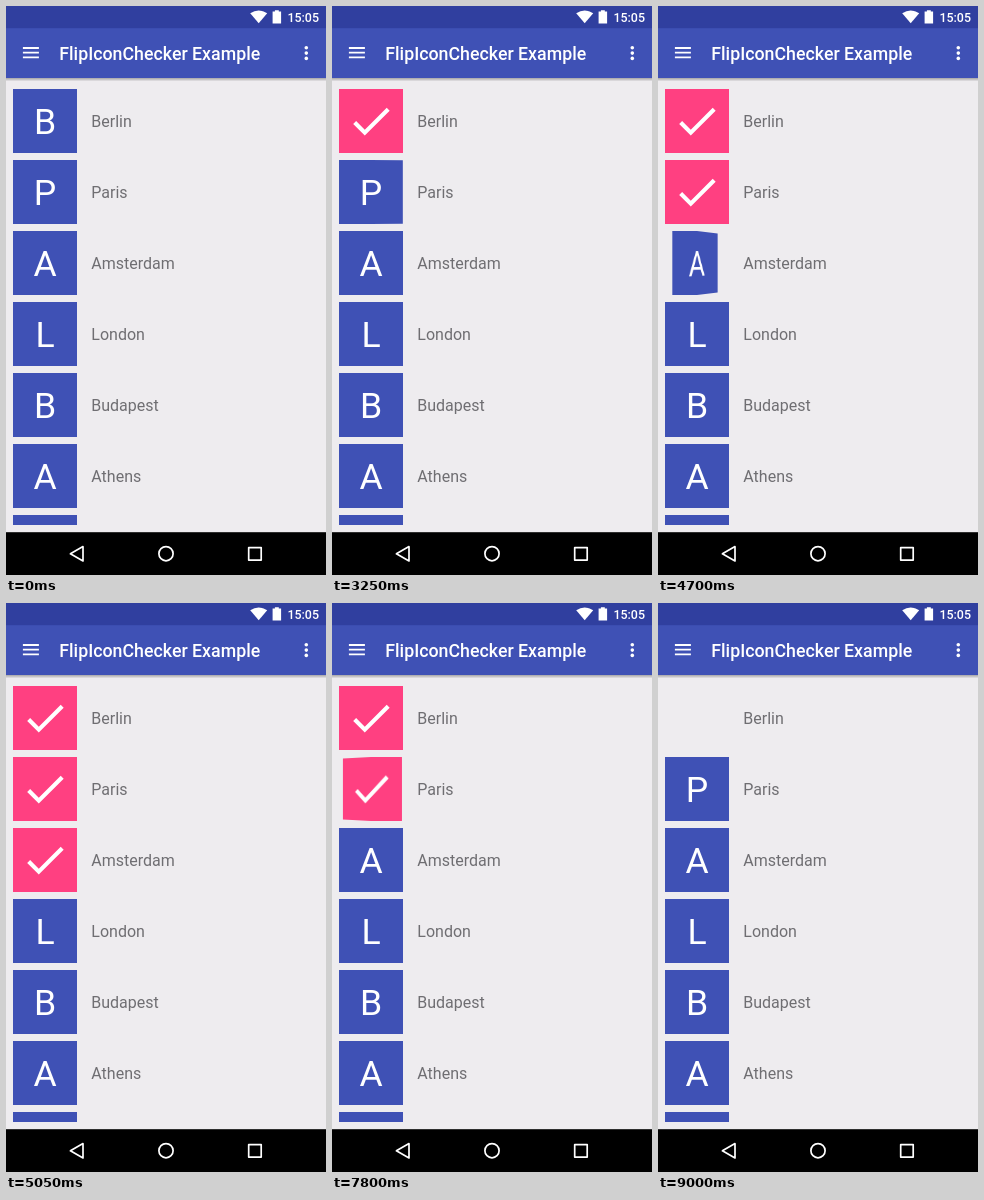
Write an HTML page that moves like this. It is 320x569 px and loops after 9050 ms.

```html
<!DOCTYPE html>
<html lang="en">
<head>
<meta charset="utf-8">
<title>FlipIconChecker Example</title>
<style>
  html, body { margin: 0; width: 100%; height: 100%; overflow: hidden; background: #eeecef; }
  #stage { position: relative; width: 320px; height: 569px; overflow: hidden; font-family: Roboto, sans-serif; }
  #stage > svg { position: absolute; left: 0; top: 0; }
  #list { position: absolute; left: 0; top: 72px; width: 320px; height: 447.1px; overflow: hidden; }
  .tile { position: absolute; left: 7.11px; width: 64px; height: 64px; overflow: hidden; }
  .tile svg { position: absolute; left: 0; top: 0; }
  .city { position: absolute; left: 85.3px; height: 64px; line-height: 65px; font-size: 16px; color: #6f6e72; white-space: nowrap; }
</style>
</head>
<body>
<div id="stage">
  <div id="list"></div>
  <svg width="320" height="569" viewBox="0 0 320 569">
    <defs>
      <linearGradient id="shade" x2="0" y2="1">
        <stop stop-color="#000" stop-opacity=".3"/>
        <stop offset="1" stop-color="#000" stop-opacity="0"/>
      </linearGradient>
    </defs>
    <rect y="72" width="320" height="3.5" fill="url(#shade)"/>
    <rect width="320" height="72" fill="#3f51b5"/>
    <rect width="320" height="22.2" fill="#303f9f"/>
    <g fill="#fff">
      <path d="M252.7 17.2 L244.2 7.3 Q252.7 1.6 261.2 7.3Z"/>
      <path d="M266.6 5.6h2.3V4.2h3.9v1.4h2.3v12h-8.5z"/>
      <text x="313" y="16" text-anchor="end" font-size="12.44" font-weight="500">15:05</text>
      <path d="M16.9 41.1h16v1.8h-16zM16.9 45.8h16v1.8h-16zM16.9 50.5h16v1.8h-16z"/>
      <text x="53.3" y="54" font-size="17.78" font-weight="500">FlipIconChecker Example</text>
      <circle cx="300.3" cy="41.8" r="1.8"/>
      <circle cx="300.3" cy="47.1" r="1.8"/>
      <circle cx="300.3" cy="52.4" r="1.8"/>
    </g>
    <rect y="526.2" width="320" height="43" fill="#000"/>
    <g fill="none" stroke="#fff" stroke-width="1.7" stroke-linejoin="round">
      <path d="M64.4 547.8 L77 540.6 V555Z"/>
      <circle cx="160" cy="547.7" r="7.1"/>
      <rect x="242.7" y="541.6" width="12.5" height="12.5"/>
    </g>
  </svg>
</div>
<script>
const LOOP = 9050, STEP = 50;
const HALF = 125, GAP = 30, FLIP = 2 * HALF + GAP, POP = 130;
const ROW = 71.11;
const cities = ['Berlin', 'Paris', 'Amsterdam', 'London', 'Budapest', 'Athens', ''];
const flips = [
  { row: 0, at: 1575, check: true },
  { row: 1, at: 3247, check: true },
  { row: 2, at: 4637, check: true },
  { row: 2, at: 6568, check: false },
  { row: 1, at: 7768, check: false },
  { row: 0, at: 8847, check: false }
];

const face = (color, mark) =>
  `<svg width="64" height="64"><rect width="64" height="64" fill="${color}"/>${mark}</svg>`;
const letter = c =>
  `<text x="32" y="44.9" text-anchor="middle" font-size="35.6" fill="#fff">${c}</text>`;
const tick = '<path fill="#fff" d="M9 16.17L4.83 12l-1.42 1.41L9 19 21 7l-1.41-1.41z"/>';

const list = document.getElementById('list');
list.innerHTML = cities.map((name, i) => {
  const top = `style="top:${(10.67 + i * ROW).toFixed(2)}px"`;
  return `<div class="tile" ${top}>${face('#3f51b5', letter(name.charAt(0)))}${face('#ff4081', tick)}</div>
    <div class="city" ${top}>${name}</div>`;
}).join('');

const tiles = [...list.querySelectorAll('.tile')].map(el => {
  const [front, back] = el.children;
  return { front, back, tick: back.querySelector('path') };
});

function drawTile(tile, i, t) {
  const flip = flips.filter(f => f.row === i && f.at <= t).pop();
  let checked = false, angle = 0, pop = 1;
  if (flip) {
    const p = t - flip.at, dir = flip.check ? 1 : -1;
    const second = p >= HALF + GAP;
    checked = second === flip.check;
    if (p < HALF) angle = dir * 90 * p / HALF;
    else if (!second) angle = 90;
    else angle = -dir * 90 * Math.max(0, FLIP - p) / HALF;
    if (flip.check) pop = Math.min(1, Math.max(0, (p - FLIP) / POP));
  }
  const shown = checked ? tile.back : tile.front;
  const hidden = checked ? tile.front : tile.back;
  hidden.style.visibility = 'hidden';
  shown.style.visibility = Math.abs(angle) === 90 ? 'hidden' : 'visible';
  shown.style.transform = angle ? `perspective(256px) rotateY(${angle}deg)` : 'none';
  tile.tick.setAttribute('transform', `translate(32 32) scale(${2.074 * pop}) translate(-12 -12)`);
}

function draw(ms) {
  const t = Math.floor((ms % LOOP) / STEP) * STEP;
  tiles.forEach((tile, i) => drawTile(tile, i, t));
}

const start = performance.now();
function tickFrame() {
  draw(performance.now() - start);
  requestAnimationFrame(tickFrame);
}
tickFrame();
</script>
</body>
</html>
```
